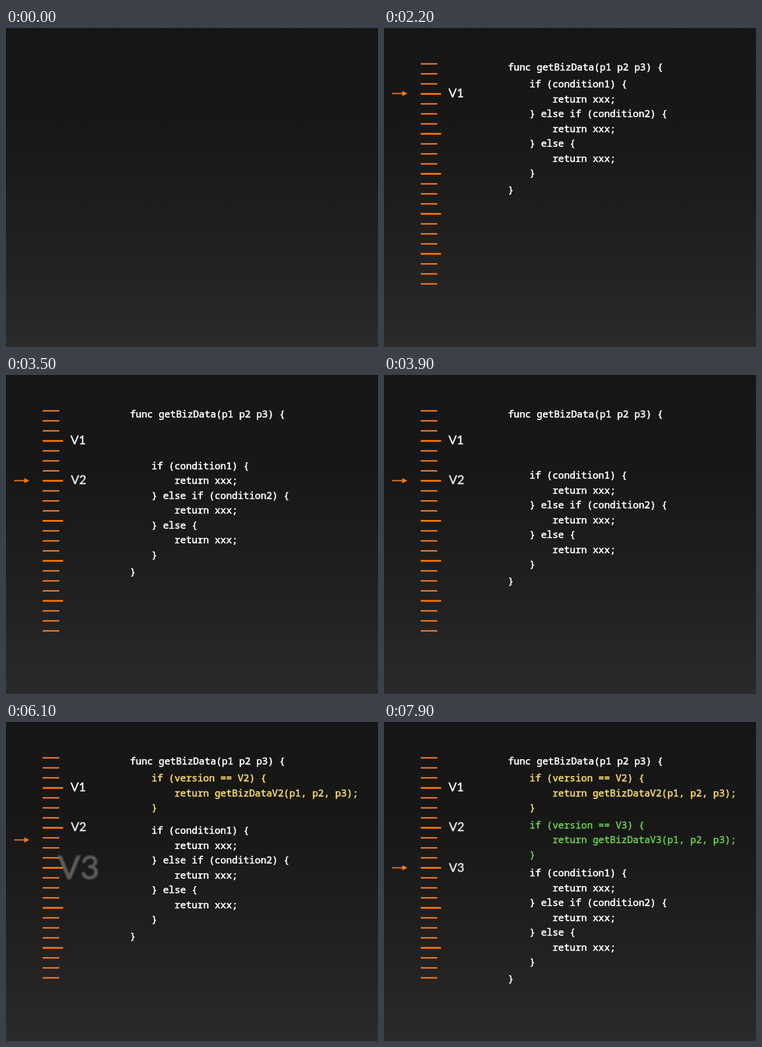
Write an HTML page that moves like this. It is 639x548 px and loops after 8000 ms.

```html
<!DOCTYPE html>
<html lang="en">
<head>
<meta charset="utf-8">
<title>Versioned function</title>
<style>
  html, body { margin: 0; width: 100%; height: 100%; overflow: hidden; background: #171717; }
  svg { display: block; width: 639px; height: 548px; }
  .code text { font: 400 16.45px "Noto Sans Mono", "DejaVu Sans Mono", monospace; white-space: pre; }
  .label { font: 400 21px Lato, "Open Sans", sans-serif; text-anchor: middle; stroke-width: .35; }
  .code { stroke-width: .65; }
  .code, .label { fill: #fff; stroke: #fff; }
  .minor { stroke: #ec792c; stroke-width: 2.5; }
  .major { stroke: #ff7608; stroke-width: 3; }
  #v2code { fill: #f8da60; stroke: #f8da60; }
  #v3code { fill: #6cdb48; stroke: #6cdb48; stroke-width: .45; }

  /* every track shares the 8 s loop and a sine in-out ease */
  .anim { animation: 8s cubic-bezier(.37, 0, .63, 1) infinite both; }
  .frame { animation-name: frame; }
  #arrow { animation-name: arrow; }
  #rest { animation-name: push; }
  #body { animation-name: body; }
  #v2code { animation-name: v2code; }
  #v3code { animation-name: v3code; }
  #v1 { animation-name: drop1; }
  #v2 { animation-name: drop2; }
  #v3 { animation-name: drop3; }

  @keyframes frame { 0%, 3.41% { opacity: 0 } 14.77%, 100% { opacity: 1 } }
  @keyframes body { 0%, 14.66% { opacity: 0 } 26.02%, 100% { opacity: 1 } }
  @keyframes v2code { 0%, 48.75% { opacity: 0 } 58.52%, 100% { opacity: 1 } }
  @keyframes v3code { 0%, 86.25% { opacity: 0 } 96.02%, 100% { opacity: 1 } }

  @keyframes arrow {
    0%, 35.91% { transform: translateY(0) }
    43.54%, 73.41% { transform: translateY(69px) }
    81.04%, 100% { transform: translateY(138px) }
  }
  @keyframes push {
    0%, 35.91% { transform: translateY(0) }
    47.27% { transform: translateY(76px) }
    58.52%, 73.41% { transform: translateY(78px) }
    84.77% { transform: translateY(161px) }
    96.02%, 100% { transform: translateY(163px) }
  }

  @keyframes drop1 {
    0%, 14.66% { opacity: 0; transform: scale(3.44); filter: blur(.5px) }
    22.29%, 100% { opacity: 1; transform: scale(1); filter: blur(0) }
  }
  @keyframes drop2 {
    0%, 35.91% { opacity: 0; transform: scale(3.44); filter: blur(.5px) }
    43.54%, 100% { opacity: 1; transform: scale(1); filter: blur(0) }
  }
  @keyframes drop3 {
    0%, 73.41% { opacity: 0; transform: scale(3.44); filter: blur(.5px) }
    81.04%, 100% { opacity: 1; transform: scale(1); filter: blur(0) }
  }
</style>
</head>
<body>
<svg viewBox="0 0 639 548">
  <defs>
    <linearGradient id="dusk" x2="0" y2="1">
      <stop offset="0" stop-color="#161616"/>
      <stop offset=".3" stop-color="#171717"/>
      <stop offset=".55" stop-color="#1d1d1c"/>
      <stop offset=".75" stop-color="#222222"/>
      <stop offset="1" stop-color="#2a2a2a"/>
    </linearGradient>
  </defs>
  <rect width="639" height="548" fill="url(#dusk)"/>

  <g id="ruler" class="anim frame"></g>
  <g class="anim frame">
    <g id="arrow" class="anim">
      <path d="M14 112.5H35" stroke="#f07a22" stroke-width="2"/>
      <path d="M31.5 108L40 112.5L31.5 117Z" fill="#ff7a14"/>
    </g>
  </g>

  <g transform="translate(124 112)"><text id="v1" class="anim label" y="7.3">V1</text></g>
  <g transform="translate(124.7 180.3)"><text id="v2" class="anim label" y="7.3">V2</text></g>
  <g transform="translate(124.7 250.5)"><text id="v3" class="anim label" y="7.3">V3</text></g>

  <g class="code">
    <g id="head" class="anim frame"></g>
    <g id="v2code" class="anim"></g>
    <g id="v3code" class="anim"></g>
    <g id="rest" class="anim">
      <g id="body" class="anim"></g>
      <g id="tail" class="anim frame"></g>
    </g>
  </g>
</svg>
<script>
  const LEADING = 25.5;

  function add(parent, tag, attrs) {
    const el = document.createElementNS("http://www.w3.org/2000/svg", tag);
    for (const name in attrs) el.setAttribute(name, attrs[name]);
    return document.getElementById(parent).appendChild(el);
  }

  function block(parent, x, y, lines) {
    lines.forEach((line, i) => {
      add(parent, "text", { x, y: y + i * LEADING }).textContent = line;
    });
  }

  const guard = v => [
    `if (version == ${v}) {`,
    `    return getBizData${v}(p1, p2, p3);`,
    "}"
  ];

  for (let i = 0; i < 23; i++) {
    const major = i % 4 === 3, y = 61.6 + i * 17.18;
    add("ruler", "line", { x1: 63, x2: major ? 98 : 91.5, y1: y, y2: y, class: major ? "major" : "minor" });
  }

  block("head", 213, 73, ["func getBizData(p1 p2 p3) {"]);
  block("v2code", 250, 102, guard("V2"));
  block("v3code", 250, 182.5, guard("V3"));
  block("body", 250, 102, [
    "if (condition1) {",
    "    return xxx;",
    "} else if (condition2) {",
    "    return xxx;",
    "} else {",
    "    return xxx;",
    "}"
  ]);
  block("tail", 213, 284, ["}"]);
</script>
</body>
</html>
```
